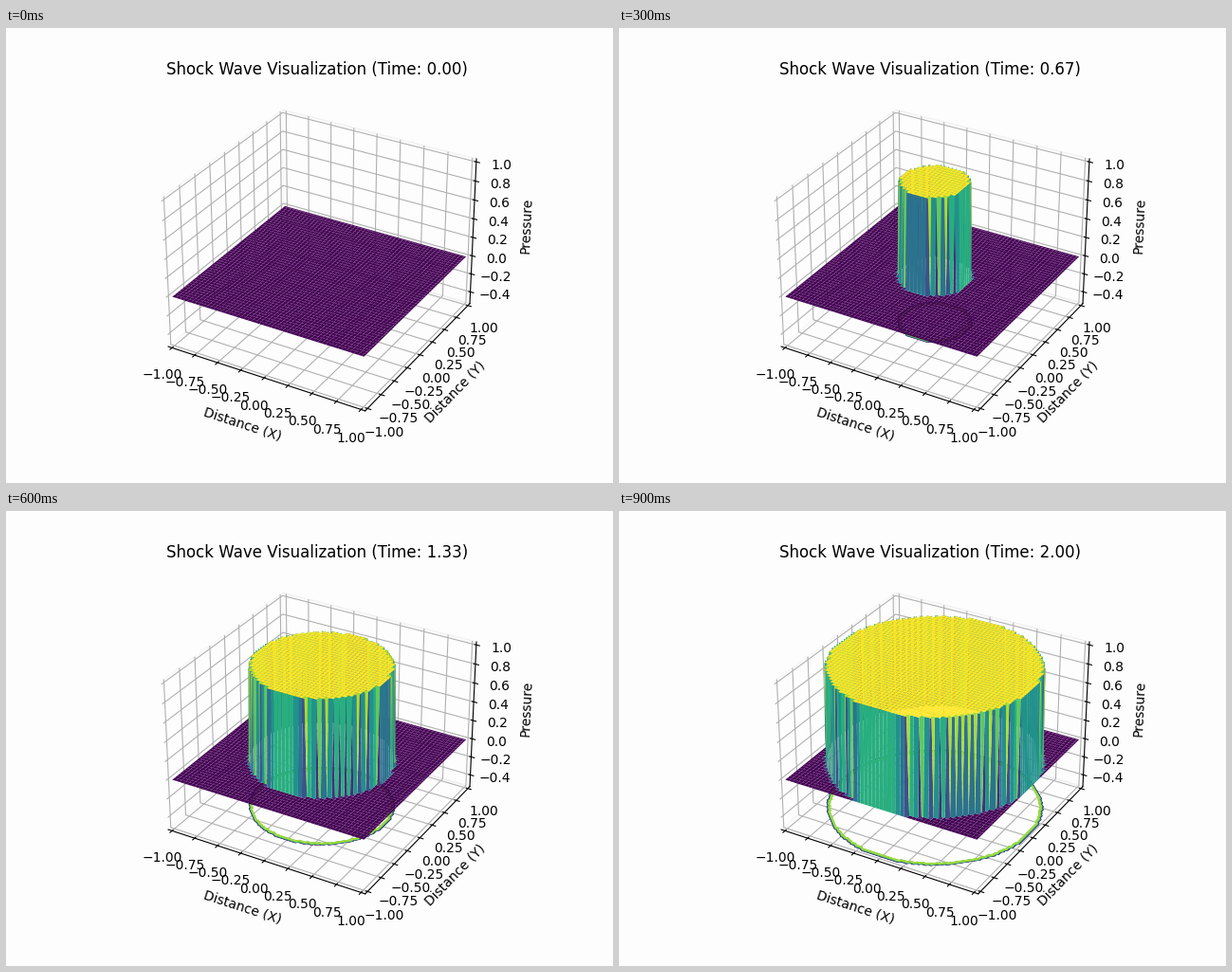
A matplotlib script for the animation above (1 s loop, 640 by 480 pixels).

```python
import numpy as np
import matplotlib.pyplot as plt
from matplotlib.animation import FuncAnimation

FRAMES = 10
INTERVAL = 100
END_TIME = 2.0
SPEED = 0.5
FLOOR = -0.5
MARGIN = 1 / 48

plt.rcParams["font.family"] = "DejaVu Sans"

side = np.linspace(-1, 1, 100)
X, Y = np.meshgrid(side, side)
R = np.hypot(X, Y)

fig = plt.figure(figsize=(6.4, 4.8), dpi=100, facecolor="#fdfdfd")
ax = fig.add_subplot(projection="3d", facecolor="none")
ax.set_xlim(-1, 1, view_margin=MARGIN)
ax.set_ylim(-1, 1, view_margin=MARGIN)
ax.set_zlim(FLOOR, 1, view_margin=MARGIN)
ax.set_xlabel("Distance (X)")
ax.set_ylabel("Distance (Y)")
ax.set_zlabel("Pressure")
for axis in (ax.xaxis, ax.yaxis, ax.zaxis):
    axis.pane.set_facecolor("none")


def draw(frame):
    for artist in list(ax.collections):
        artist.remove()
    time = END_TIME * frame / (FRAMES - 1)
    pressure = np.where(R < SPEED * time, 1.0, 0.0)
    ax.plot_surface(X, Y, pressure, cmap="viridis")
    if pressure.any():
        ax.contour(X, Y, pressure, zdir="z", offset=FLOOR, cmap="viridis")
    ax.set_title(f"Shock Wave Visualization (Time: {time:.2f})")
    return ax.collections


anim = FuncAnimation(fig, draw, frames=FRAMES, init_func=lambda: draw(0),
                     interval=INTERVAL, repeat=True, repeat_delay=0)
plt.show()
```
